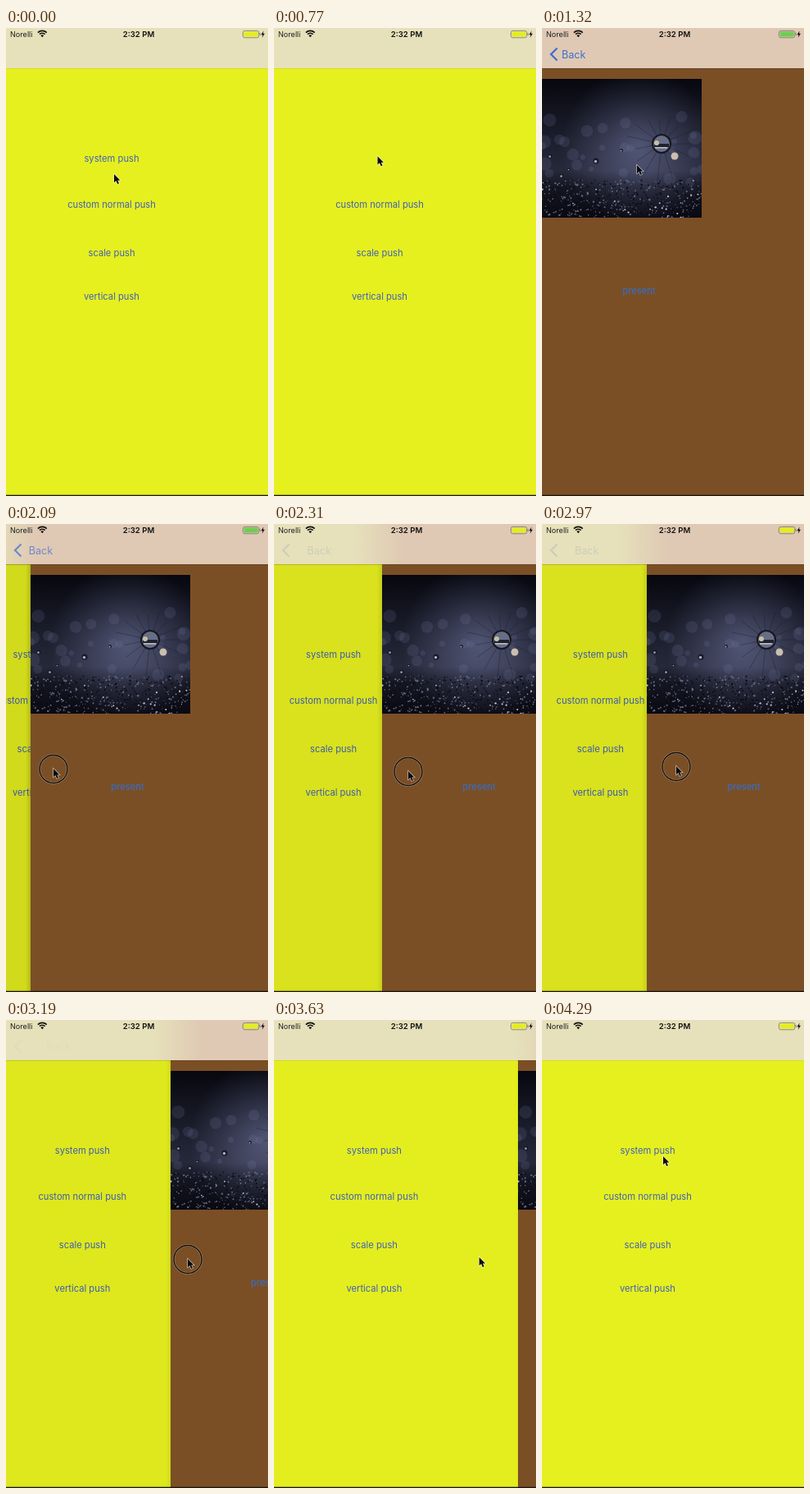
Recreate the animation shown at these times as an HTML page with a canvas. Size 320 px wide and 570 px high, loop 4.4 s.

```html
<!DOCTYPE html>
<html lang="en">
<head>
<meta charset="utf-8">
<title>Swipe back</title>
<style>
html, body { margin: 0; width: 100%; height: 100%; overflow: hidden; background: #e6f01e; }
canvas { display: block; }
</style>
</head>
<body>
<canvas id="stage" width="320" height="570"></canvas>
<script>
const W = 320, H = 570, LOOP = 4400, STEP = 110;
const g = document.getElementById('stage').getContext('2d');

// Keyframes: time, then values
const PAGE = [[0, 320], [825, 320], [880, 236], [990, 78], [1100, 12], [1210, 0], [1870, 0], [1980, 8],
  [2090, 30], [2200, 78], [2310, 132], [2420, 178], [2530, 190], [2640, 162], [2750, 120], [2860, 104],
  [2970, 128], [3080, 166], [3190, 201], [3300, 218], [3410, 228], [3520, 262], [3630, 298], [3740, 316], [3850, 320]];
const POINTER = [[0, 132, 178], [330, 130, 170], [660, 127, 156], [1100, 125, 157], [1320, 116, 167],
  [1540, 60, 240], [1760, 6, 298], [1870, 12, 299], [1980, 32, 298], [2090, 58, 298], [2200, 108, 300],
  [2310, 164, 301], [2420, 206, 301], [2530, 190, 301], [2640, 146, 300], [2750, 128, 299], [2860, 132, 297],
  [2970, 164, 295], [3080, 198, 293], [3190, 222, 291], [3410, 252, 291], [3740, 250, 288],
  [3960, 222, 256], [4180, 158, 180], [4290, 148, 166], [4400, 140, 172]];

const mix = (a, b, k) => a + (b - a) * k;
const fade = k => Math.max(0, Math.min(1, k));

function track(keys, t) {
  const i = Math.max(1, keys.findIndex(k => k[0] > t));
  const [a, b] = [keys[i - 1], keys[i]];
  if (t >= keys[keys.length - 1][0]) return keys[keys.length - 1].slice(1);
  const k = (t - a[0]) / (b[0] - a[0]);
  return a.slice(1).map((v, n) => mix(v, b[n + 1], k));
}

function rect(color, x, y, w, h) {
  g.fillStyle = color;
  g.fillRect(x, y, w, h);
}

function disc(color, x, y, r) {
  g.fillStyle = color;
  g.beginPath();
  g.arc(x, y, r, 0, 7);
  g.fill();
}

function label(s, x, y, size, color, align = 'left', weight = 400) {
  g.font = `${weight} ${size}px Inter, "Liberation Sans", sans-serif`;
  g.textAlign = align;
  g.fillStyle = color;
  g.fillText(s, x, y);
}

function gradient(x0, y0, x1, y1, ...stops) {
  const f = g.createLinearGradient(x0, y0, x1, y1);
  stops.forEach(([k, c]) => f.addColorStop(k, c));
  return f;
}

function menu(x, t) {
  rect('#e6f01e', 0, 49, W, H - 49);
  g.globalAlpha = t >= 660 && t < 880 ? 0 : t < 660 ? 1 : fade((t - 770) / 330);
  const item = (s, y) => label(s, x + 129, y, 11.2, '#4060bd', 'center');
  item('system push', 162.5);
  g.globalAlpha = 1;
  item('custom normal push', 218.5);
  item('scale push', 278);
  item('vertical push', 330.5);
}

// Soft night scene with blurred lights, a drop and glittering ground
function photo() {
  let seed = 11;
  const rnd = () => (seed = seed * 16807 % 2147483647) / 2147483647;
  g.save();
  g.beginPath();
  g.rect(0, 62, 195, 169);
  g.clip();
  rect(gradient(0, 62, 0, 231, [0, '#0c0d15'], [.3, '#282b3b'], [.66, '#464a64'], [.78, '#262837'], [1, '#10111a']), 0, 62, 195, 169);
  const glow = g.createRadialGradient(118, 145, 5, 118, 145, 95);
  glow.addColorStop(0, 'rgba(100,106,145,.5)');
  glow.addColorStop(1, 'rgba(0,0,8,.45)');
  rect(glow, 0, 62, 195, 169);
  for (let i = 0; i < 28; i++) disc('rgba(135,143,185,.15)', rnd() * 195, 108 + rnd() * 80, 3 + rnd() * 6);
  g.strokeStyle = 'rgba(20,22,36,.5)';
  g.lineWidth = .7;
  g.beginPath();
  for (let i = 0; i < 15; i++) {
    const a = i * .42, r = 24 + rnd() * 22;
    g.moveTo(146, 141);
    g.lineTo(146 + r * Math.cos(a), 141 + r * Math.sin(a));
  }
  g.stroke();
  for (let i = 0; i < 650; i++) {
    const v = rnd(), y = 231 - 46 * Math.pow(rnd(), 1.2);
    disc(v > .93 ? '#bcc1d6' : v > .55 ? '#616780' : '#0c0d14', rnd() * 195, y, .4 + rnd() * .8);
  }
  for (const [x, y, r] of [[10, 156, 2.5], [66, 162, 3.5], [97, 149, 2], [24, 180, 2.5], [33, 172, 1.5]]) {
    disc('#171924', x, y, r);
    disc('#a5acc6', x - .5, y + .5, r * .5);
  }
  disc('#c9bfae', 162, 156, 4.5);
  disc('#151720', 146, 141, 12);
  disc('#676e86', 146, 141, 10);
  rect('#20222e', 137, 141, 18, 4);
  rect('#c3c6ce', 138, 145, 15, 1.5);
  disc('#c7c1a5', 140, 140, 3);
  g.restore();
}

function detail(x, p) {
  if (x >= W) return;
  rect(gradient(x - 6, 0, x, 0, [0, 'rgba(0,0,0,0)'], [1, `rgba(0,0,0,${.16 * (1 - p)})`]), x - 6, 49, 6, H - 49);
  g.save();
  g.translate(x, 0);
  rect('#7b4f25', 0, 49, W, H - 49);
  photo();
  label('present', 118.5, 324, 11.3, '#2f70d6', 'center');
  g.restore();
}

function statusBar(p) {
  label('Norelli', 5, 11, 9.1, '#222');
  label('2:32 PM', 162, 11, 9.6, '#111', 'center', 600);
  g.strokeStyle = '#111';
  g.lineWidth = 1.7;
  for (const r of [4.7, 7.6]) {
    g.beginPath();
    g.arc(44.3, 11, r, -Math.PI * .75, -Math.PI * .25);
    g.stroke();
  }
  g.fillStyle = '#111';
  g.beginPath();
  g.moveTo(44.3, 11.3);
  g.arc(44.3, 11, 2.6, -Math.PI * .75, -Math.PI * .25);
  g.fill();
  g.strokeStyle = '#77785f';
  g.lineWidth = .8;
  g.beginPath();
  g.roundRect(289.4, 3.4, 19.4, 8.4, 2.3);
  g.stroke();
  g.fillStyle = p > .3 ? '#e3ec22' : '#70cc55';
  g.beginPath();
  g.roundRect(290.6, 4.6, 17, 6, 1.2);
  g.fill();
  rect('#77785f', 309.6, 6, 1, 3);
  g.fillStyle = '#111';
  g.fill(new Path2D('M314.6 3.5L311.5 8.2H313.5L312.7 11.8L316 6.8H314Z'));
}

function navBar(x, p) {
  const edge = x * 1.19 - 30;
  rect(gradient(edge - 30, 0, edge + 30, 0, [0, '#e6e1ba'], [1, '#dfc9b4']), 0, 0, W, 49);
  rect(`rgba(60,50,40,${mix(.5, .12, p)})`, 0, 49, W, .7);
  g.globalAlpha = Math.pow(1 - p, 3.5);
  g.strokeStyle = '#3f6fce';
  g.lineWidth = 2.3;
  g.beginPath();
  g.moveTo(18.5, 24.5);
  g.lineTo(11, 32);
  g.lineTo(18.5, 39.5);
  g.stroke();
  label('Back', 24 + 40 * p, 36.7, 12.6, '#3f6fce');
  g.globalAlpha = 1;
  statusBar(p);
}

function pointer(x, y, pressed) {
  if (pressed) {
    for (const [color, width] of [['rgba(255,255,255,.3)', 2.6], ['#111', 1.4]]) {
      g.strokeStyle = color;
      g.lineWidth = width;
      g.beginPath();
      g.arc(x, y + .5, 17, 0, 7);
      g.stroke();
    }
  }
  g.save();
  g.translate(x, y);
  const arrow = new Path2D('M0 0V10.2L2.4 8L4.2 12L6 11.2L4.3 7.4H7.4Z');
  g.strokeStyle = 'rgba(255,255,255,.75)';
  g.lineWidth = 1.2;
  g.stroke(arrow);
  g.fillStyle = '#0b0b10';
  g.fill(arrow);
  g.restore();
}

function draw(t) {
  const [x] = track(PAGE, t), p = x / W;
  menu(-.3 * (W - x), t);
  rect(`rgba(0,0,0,${.1 * (1 - p)})`, 0, 49, W, H - 49);
  detail(x, p);
  navBar(x, p);
  rect('#15150a', 0, 568.7, W, 1.3);
  pointer(...track(POINTER, t), t >= 1760 && t < 3410);
}

const start = performance.now();
function tick() {
  const t = (performance.now() - start) % LOOP;
  draw(Math.floor(t / STEP) * STEP);
  requestAnimationFrame(tick);
}
tick();
</script>
</body>
</html>
```
